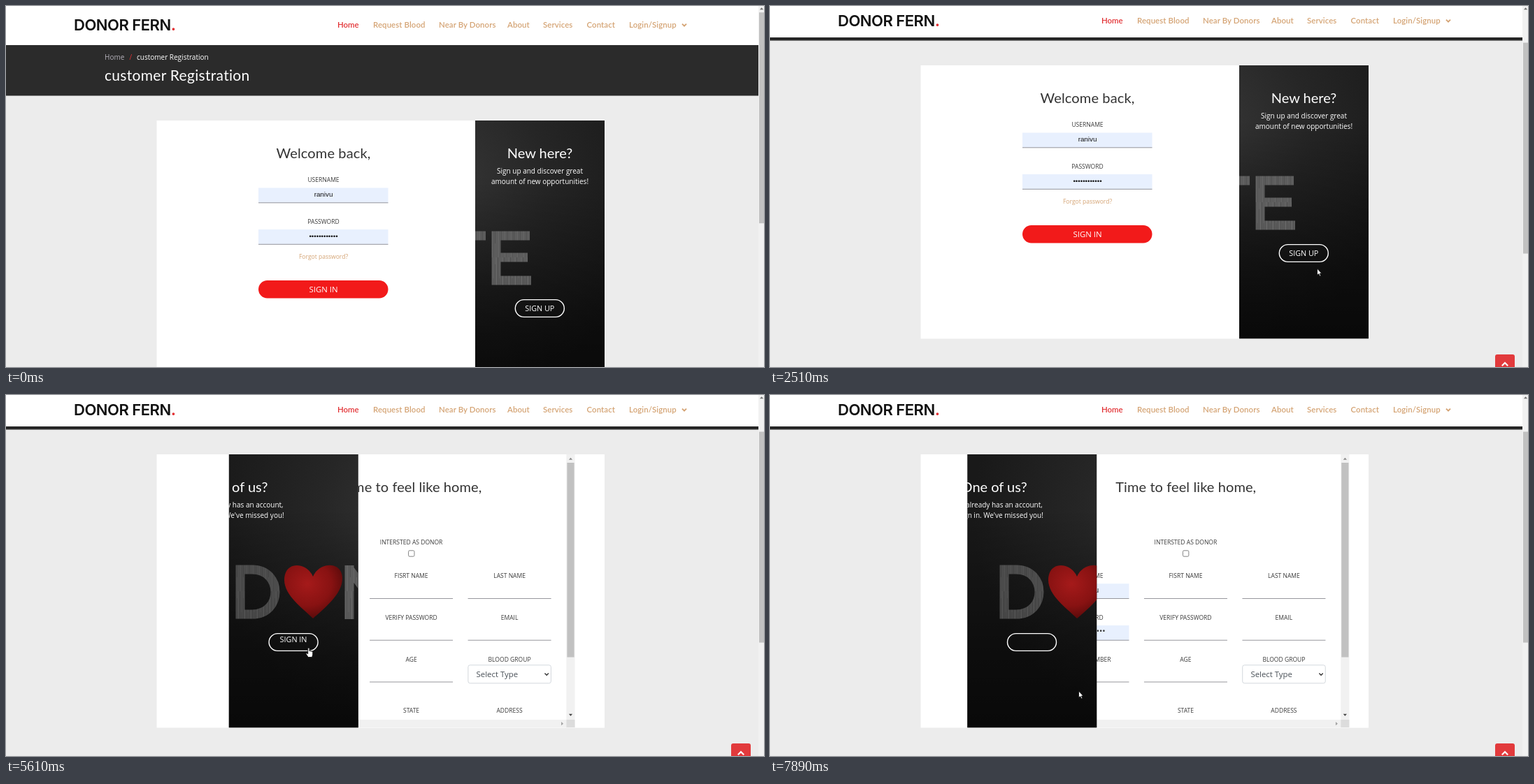
Write an HTML page that moves like this. It is 1084x517 px and loops after 7.99 s.

```html
<!DOCTYPE html>
<html lang="en">
<head>
<meta charset="utf-8">
<title>Registration</title>
<style>
html, body { margin: 0; width: 100%; height: 100%; overflow: hidden; background: #ececec; }
svg { display: block; width: 1084px; height: 517px; }
text { font-family: "Open Sans", sans-serif; white-space: pre; }
.m { text-anchor: middle; }
.label { font-size: 8.54px; fill: #3a3a3a; }
.head { font-family: Lato, sans-serif; font-size: 20px; fill: #333; }
.nav { font-family: Lato, sans-serif; font-size: 11.4px; font-weight: 600; fill: #d4a373; }
.logo { font-family: Inter, sans-serif; font-size: 22px; font-weight: 600; letter-spacing: -.5px; fill: #111; }
.arial { font-family: "Liberation Sans", Arial, sans-serif; font-size: 9.8px; fill: #111; }
.mid { font-size: 11.4px; fill: #333; }
.small { font-size: 10px; }
.white { fill: #fff; }
.red { fill: #e23033; }
.tan { fill: #d4a373; }
</style>
</head>
<body>
<svg viewBox="0 0 1084 517" xmlns="http://www.w3.org/2000/svg">
  <defs>
    <clipPath id="card"><rect x="215.5" y="164" width="640.5" height="391.5"/></clipPath>
    <clipPath id="slider"><rect id="sliderRect" x="671" y="164" width="641" height="391.5"/></clipPath>
    <clipPath id="win"><rect id="winRect" x="671" y="164" width="185" height="391.5"/></clipPath>
    <clipPath id="pill"><rect x="728.5" y="420.5" width="70" height="25" rx="12.5"/></clipPath>
    <radialGradient id="glow" gradientUnits="userSpaceOnUse" cx="610" cy="250" r="320">
      <stop offset="0" stop-color="#383838"/><stop offset=".5" stop-color="#262626"/><stop offset="1" stop-color="#191919"/>
    </radialGradient>
    <linearGradient id="dim" x1="0" y1="0" x2="0" y2="1">
      <stop offset=".2" stop-opacity="0"/><stop offset=".75" stop-opacity=".5"/><stop offset="1" stop-opacity=".65"/>
    </linearGradient>
    <radialGradient id="heart" cx=".4" cy=".35" r=".75">
      <stop offset="0" stop-color="#a51a1a"/><stop offset=".55" stop-color="#881212"/><stop offset="1" stop-color="#4a0808"/>
    </radialGradient>
    <pattern id="chalk" patternUnits="userSpaceOnUse" width="9" height="90">
      <rect width="9" height="90" fill="#5d5d5d"/>
      <path d="M1.5 0V50M4 30V90M6.5 10V70" stroke="#505050"/>
      <path d="M2.8 40V90M8 0V45" stroke="#6b6b6b" stroke-width=".8"/>
    </pattern>
    <filter id="soft" x="-.1" y="-1" width="1.2" height="4"><feGaussianBlur stdDeviation="2.5"/></filter>
  </defs>

  <rect width="1084" height="517" fill="#ececec"/>

  <g id="page">
    <rect y="50" width="1076" height="78.5" fill="#2b2b2b"/>
    <g id="crumbs"></g>
    <rect y="626.5" width="1076" height="60" fill="#17191c"/>
    <g clip-path="url(#card)">
      <rect x="215" y="164" width="642" height="392" fill="#fff"/>
      <g id="signIn"></g>
      <g clip-path="url(#slider)">
        <rect x="215" y="164" width="642" height="392" fill="#fff"/>
        <g id="signUp"></g>
      </g>
      <g clip-path="url(#win)">
        <rect x="215" y="164" width="642" height="392" fill="url(#glow)"/>
        <rect x="215" y="164" width="642" height="392" fill="url(#dim)"/>
        <g fill="none" stroke="url(#chalk)" stroke-width="13" stroke-linejoin="bevel">
          <path d="M335 329V393H352C396 393 396 329 352 329Z" stroke-linejoin="miter" opacity=".75"/>
          <path d="M491 400V323M491 328L540 395M540 400V323"/>
          <path d="M559 400L588 327L617 400M568 376H608"/>
          <path d="M625 329H686M655 329V400"/>
          <path d="M749 329H701V393H751M701 360H746" stroke-linejoin="miter"/>
        </g>
        <path d="M439 339C430 318 398 316 398 344C398 366 425 385 439 399C455 385 481 364 481 342C481 316 448 318 439 339Z" fill="url(#heart)"/>
        <g id="panel">
          <g id="upText"></g>
          <g id="inText"></g>
          <rect x="728.3" y="420.6" width="70" height="24.8" rx="12.4" fill="none" stroke="#fff" stroke-width="1.4"/>
          <g clip-path="url(#pill)"><g id="upBtn"></g><g id="inBtn"></g></g>
        </g>
      </g>
    </g>
  </g>

  <g id="top">
    <rect x="1037" y="499" width="28" height="28" rx="3" fill="#e23a3c"/>
    <path d="M1046.8 515.2l4.2-4.2 4.2 4.2" fill="none" stroke="#fff" stroke-width="2.2"/>
  </g>

  <rect id="shade" width="1076" height="5" fill="#000" opacity="0" filter="url(#soft)"/>
  <rect id="bar" width="1076" height="56" fill="#fff"/>
  <g id="menu"></g>

  <rect x="1076" width="8" height="517" fill="#f1f1f1"/>
  <path d="M1078 5.2l2.6-3 2.6 3z" fill="#707070"/>
  <rect id="thumb" x="1077" y="9" width="7" height="302" fill="#c1c1c1"/>

  <g id="cursor" fill="#fff" stroke="#111" stroke-width=".9" stroke-linejoin="round">
    <path id="arrow" d="M0 0V9.6L2.2 7.6L3.7 11L5.2 10.3L3.8 7H6.6Z"/>
    <path id="hand" d="M-1.2 7.2V.8Q-1.2-.4-.1-.4Q1-.4 1 .8V4Q5.6 4 5.8 6V9.4L4.7 13H-.7L-4 8.3Q-3.6 6.4-1.2 8.2Z"/>
  </g>
</svg>

<script>
const $ = id => document.getElementById(id);
const put = (id, ...parts) => { $(id).innerHTML = parts.join(""); };
const text = (x, y, s, cls, gap) =>
  `<text x="${x}" y="${y}" class="${cls}"${gap ? ` letter-spacing="${gap}"` : ""}>${s}</text>`;
const rect = (x, y, w, h, fill, extra = "") =>
  `<rect x="${x}" y="${y}" width="${w}" height="${h}" fill="${fill}" ${extra}/>`;
const tri = (x, y, turn, fill) =>
  `<path d="M-2.6 1.5L0-1.5L2.6 1.5Z" fill="${fill}" transform="translate(${x} ${y}) rotate(${turn})"/>`;
const field = (x, y, w, filled) =>
  (filled ? rect(x, y, w, 21.5, "#e8f0fe") : "") + rect(x, y + 20.8, w, 1, "#96969c");

const USER = "ranivu", DOTS = "•".repeat(12);

put("menu",
  `<text x="97" y="35" class="logo">DONOR FERN<tspan class="red" font-weight="700">.</tspan></text>`,
  text(474, 31, "Home", "nav red"),
  ...[[525, "Request Blood"], [619, "Near By Donors"], [717, "About"], [768, "Services"],
    [830.5, "Contact"], [891, "Login/Signup"]].map(([x, s]) => text(x, 31, s, "nav", .1)),
  `<path d="M967 25.6l3 3 3-3" fill="none" stroke="#d4a373" stroke-width="1.9"/>`);

put("crumbs",
  `<text x="141" y="77.3" class="small" fill="#b4b1ba">Home</text>`,
  text(176.5, 77.3, "/", "small red"),
  text(187, 77.3, "customer Registration", "small white"),
  `<text x="141" y="107" class="head" style="fill:#fff;font-size:21px" letter-spacing=".3">customer Registration</text>`);

put("signIn",
  text(454, 218, "Welcome back,", "head m", .15),
  text(454, 252.2, "USERNAME", "label m"),
  field(361, 260.5, 185.5, true),
  text(454, 272.6, USER, "arial m"),
  text(454, 312.2, "PASSWORD", "label m"),
  field(361, 320, 185.5, true),
  text(454, 332.6, DOTS, "arial m"),
  `<text x="454" y="361.5" class="m tan" font-size="8.54">Forgot password?</text>`,
  rect(361, 393, 185.5, 25.5, "#f21a1a", 'rx="12.75"'),
  `<text x="454" y="410" class="m white" font-size="11.4">SIGN IN</text>`);

const COLS = [481, 621.5, 762];
const ROWS = [
  [341.2, "USERNAME", "FISRT NAME", "LAST NAME"],
  [400.9, "PASSWORD", "VERIFY PASSWORD", "EMAIL"],
  [460.7, "PHONE NUMBER", "AGE", "BLOOD GROUP"],
  [534, "CITY", "STATE", "ADDRESS"]];
put("signUp",
  text(621.8, 218, "Time to feel like home,", "head m", .1),
  text(621.5, 293.2, "INTERSTED AS DONOR", "label m"),
  rect(617.5, 301.8, 8.4, 8.4, "#fff", 'rx="1.6" stroke="#767676" stroke-width=".9"'),
  ...ROWS.map(([y, ...names], r) => names.map((s, c) =>
    text(COLS[c], y, s, "label m") +
    (r < 3 && r + c < 4 ? field(COLS[c] - 59.5, y + 8, 119, c == 0 && r < 2) : "")).join("")),
  text(481, 361.6, USER, "mid m"),
  text(481, 421.4, DOTS, "mid m"),
  rect(702.8, 465.8, 118.5, 26, "#fff", 'rx="2.8" stroke="#ced4da" stroke-width=".9"'),
  `<text x="714.5" y="482.8" font-size="11.4" fill="#495057">Select Type</text>`,
  `<path d="M812.4 477.4l2.7 2.8 2.7-2.8" fill="none" stroke="#333" stroke-width="1.4"/>`,
  rect(843.3, 164, 12.2, 380, "#f1f1f1"),
  rect(844.3, 176, 10.2, 278.5, "#c1c1c1"),
  tri(849.4, 170.3, 0, "#8a8a8a"), tri(849.4, 537.3, 180, "#444"),
  rect(400.5, 544, 443, 11.5, "#f1f1f1"),
  tri(406, 549.7, -90, "#a3a3a3"), tri(837.5, 549.7, 90, "#a3a3a3"),
  rect(843.3, 544, 12.2, 11.5, "#dcdcdc"));

const blurb = (title, a, b) =>
  text(763.5, 218, title, "head m white") + text(763.5, 240, a, "small m white") + text(763.5, 255, b, "small m white");
put("upText", blurb("New here?", "Sign up and discover great", "amount of new opportunities!"));
put("inText", blurb("One of us?", "If you already has an account,", "just sign in. We've missed you!"));
for (const [id, s] of [["upBtn", "SIGN UP"], ["inBtn", "SIGN IN"]])
  put(id, `<text x="763.3" y="437" class="m white" font-size="10.8">${s}</text>`);

// Cubic bezier easing, solved by bisection
const bezier = (x1, y1, x2, y2) => x => {
  if (x <= 0) return 0;
  if (x >= 1) return 1;
  const at = (a, b, s) => 3 * a * s * (1 - s) ** 2 + 3 * b * s * s * (1 - s) + s ** 3;
  let lo = 0, hi = 1;
  for (let i = 0; i < 24; i++) {
    const s = (lo + hi) / 2;
    if (at(x1, x2, s) < x) lo = s; else hi = s;
  }
  return at(y1, y2, lo);
};
const easeInOut = bezier(.42, 0, .58, 1);
const ease = bezier(.25, .1, .25, 1);

// Rows are [time, values...], joined by straight lines
const track = (rows, t) => {
  let i = rows.findIndex(r => r[0] > t);
  if (i < 0) return rows[rows.length - 1].slice(1);
  if (i == 0) return rows[0].slice(1);
  const a = rows[i - 1], b = rows[i], k = (t - a[0]) / (b[0] - a[0]);
  return a.slice(1).map((v, j) => v + (b[j + 1] - v) * k);
};

const LOOP = 7990, CLICK_UP = 3595, CLICK_IN = 7093, SLIDE = 3000;
const SCROLL = [[590, 0], [700, 70], [790, 102], [880, 112.5], [1310, 112.5], [1560, 79]];
const SHRINK = [[690, 0], [880, .74], [1160, 1]];
const FADE = [[690, 0], [880, .56], [1160, 1]];
const MOUSE = [[80, 1026, 505], [145, 972, 452], [210, 931.5, 413], [1780, 931.5, 413],
  [2510, 782.5, 376], [2580, 781.5, 375.5], [2950, 779, 364.5], [3330, 779, 364.5],
  [3420, 779, 363.5], [4700, 779, 363.5], [5610, 431.5, 362.5], [6100, 311, 356.5],
  [7100, 311, 356.5], [7600, 385, 481], [7890, 441.5, 424]];

// The picture refreshes in spans of [start, end, count]
const BEATS = [[0, 0, 1], [80, 210, 3], [610, 880, 4], [970, 1160, 3], [1360, 1560, 3],
  [1840, 2510, 8], [2580, 2580, 1], [2670, 2950, 4], [3330, 3420, 2], [3610, 4370, 9],
  [4470, 5230, 9], [5310, 6100, 9], [6200, 6460, 4], [6555, 6840, 4], [7140, 7890, 9]]
  .flatMap(([a, b, n]) => Array.from({ length: n }, (_, i) => n > 1 ? a + (b - a) * i / (n - 1) : a));
const snap = t => BEATS.reduce((last, b) => b <= t ? b : last, 0);

const move = (id, x, y) => $(id).setAttribute("transform", `translate(${x.toFixed(2)} ${y.toFixed(2)})`);
const show = (id, on) => $(id).setAttribute("opacity", +on);

function draw(t) {
  const [scroll] = track(SCROLL, t), [shrink] = track(SHRINK, t), [fade] = track(FADE, t);
  move("page", 0, -scroll);
  move("menu", 0, -6 * shrink);
  $("bar").setAttribute("height", 56 - 11 * shrink);
  $("shade").setAttribute("y", 53 - 11 * shrink);
  show("shade", .22 * shrink);
  show("top", fade);
  $("thumb").setAttribute("y", 9.2 + .549 * scroll);

  const slide = f => t < CLICK_IN ? f((t - CLICK_UP) / SLIDE) : 1 - f((t - CLICK_IN) / SLIDE);
  const p = slide(easeInOut), dx = -455.4 * p;
  // The label swap uses its own curve, also on the way back
  const b = slide(ease);
  move("signIn", -dx, 0);
  move("signUp", (455.4 - 640.4) * (1 - p) + 0, 0);
  move("panel", dx, 0);
  for (const id of ["sliderRect", "winRect"]) $(id).setAttribute("x", 671 + dx);
  // The form travels 640 to the right while its slider travels 455 to the left
  move("signUp", 455.4 + dx - 640.4 * (1 - p), 0);
  move("upText", 370 * p, 0);
  move("inText", -370 * (1 - p), 0);
  move("upBtn", 0, 51 * b);
  move("inBtn", 0, -51 * (1 - b));

  const hand = t >= 2850 && t < 4800 || t >= 5500 && t < 7200;
  move("cursor", ...track(MOUSE, t));
  show("cursor", t >= 80);
  show("hand", hand);
  show("arrow", !hand);
}

const start = performance.now();
function tick() {
  draw(snap((performance.now() - start) % LOOP));
  requestAnimationFrame(tick);
}
tick();
</script>
</body>
</html>
```
